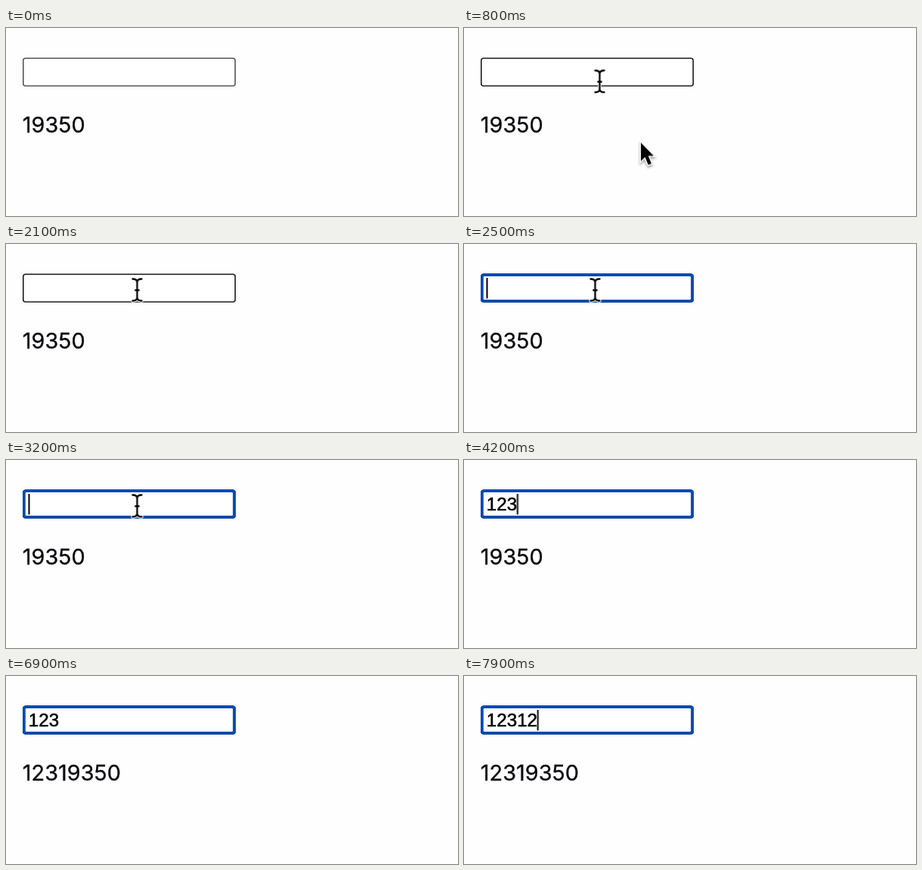
Write an HTML page that moves like this. It is 598 px wide and 250 px high and loops after 8 s.

```html
<!DOCTYPE html>
<html lang="en">
<head>
<meta charset="utf-8">
<title>Text field and label</title>
<style>
  html, body { margin: 0; width: 100%; height: 100%; overflow: hidden; background: #fefefe; }
  svg { display: block; width: 598px; height: 250px; }

  .label { font: 28.9px Inter, sans-serif; fill: #07070d; stroke: #07070d; stroke-width: .3; }
  .typed { font: 24.2px "Liberation Sans", Arial, sans-serif; fill: #000; stroke: #000; stroke-width: .5; }
  .caret { fill: #000; }
  .border { fill: #fff; stroke: #565656; stroke-width: 1.6; }
  .ring { fill: none; stroke: #0d4aad; stroke-width: 3.8; }
  .halo { fill: none; stroke: #fff; stroke-width: 4.5; stroke-linecap: round; }
  .beam { fill: none; stroke: #000; stroke-width: 2.3; stroke-linecap: round; }
  .pointer { fill: #000; stroke: #fff; stroke-width: 3; paint-order: stroke; filter: drop-shadow(0 2px 1.5px #0006); }

  /* Every change is a hard cut; 1% is 80 ms. */
  .anim { animation: 8s step-end infinite; }
  .border { animation-name: border; }
  .ring { animation-name: ring; }
  .pointer { animation-name: pointer; }
  .ibeam { animation-name: ibeam; }
  .mask { animation-name: type; }
  .caret { animation-name: blink, advance; }
  .before { animation-name: before; }
  .after { animation-name: after; }

  @keyframes border { 0% { stroke: #565656 } 7.5%, 100% { stroke: #1c1c1c } }
  @keyframes ring { 0% { visibility: hidden } 30%, 100% { visibility: visible } }
  @keyframes before { 0% { visibility: visible } 71.25%, 100% { visibility: hidden } }
  @keyframes after { 0% { visibility: hidden } 71.25%, 100% { visibility: visible } }

  @keyframes pointer {
    0% { visibility: hidden; transform: translate(240px, 175px) }
    7.5% { visibility: visible; transform: translate(240px, 175px) }
    8.75% { visibility: visible; transform: translate(234px, 152.5px) }
    11.25%, 100% { visibility: hidden; transform: translate(234px, 152.5px) }
  }
  @keyframes ibeam {
    0% { visibility: hidden; transform: translate(179.5px, 71px) }
    10% { visibility: visible; transform: translate(179.5px, 71px) }
    11.25% { visibility: visible; transform: translate(178px, 65px) }
    12.5% { visibility: visible; transform: translate(177.3px, 62.5px) }
    13.75% { visibility: visible; transform: translate(176.7px, 61.7px) }
    16.25% { visibility: visible; transform: translate(175.5px, 61px) }
    26.25% { visibility: visible; transform: translate(173.5px, 61px) }
    48.75%, 100% { visibility: hidden; transform: translate(173.5px, 61px) }
  }

  /* One digit is 13.45px wide. */
  @keyframes type {
    0% { width: 0 }
    48.75% { width: 13.45px }
    51.25% { width: 26.9px }
    52.5% { width: 40.35px }
    90% { width: 53.8px }
    96.25%, 100% { width: 67.25px }
  }
  @keyframes advance {
    0% { transform: none }
    48.75% { transform: translateX(13.45px) }
    51.25% { transform: translateX(26.9px) }
    52.5% { transform: translateX(40.35px) }
    90% { transform: translateX(53.8px) }
    96.25%, 100% { transform: translateX(67.25px) }
  }
  @keyframes blink {
    0%, 37.5%, 55%, 71.25% { visibility: hidden }
    30%, 40%, 62.5%, 90%, 100% { visibility: visible }
  }
</style>
</head>
<body>
<svg viewBox="0 0 598 250">
  <defs>
    <clipPath id="entry"><rect class="mask anim" x="30" y="42" width="0" height="33"/></clipPath>
    <path id="beam" d="M-6 -14.5C-3 -14.5 0 -13.5 0 -10C0 -13.5 3 -14.5 6 -14.5M0 -10V10M-6 14.5C-3 14.5 0 13.5 0 10C0 13.5 3 14.5 6 14.5M-2.2 0.5H2.2"/>
  </defs>

  <rect class="border anim" x="22.8" y="40.2" width="280.4" height="36.8" rx="3"/>
  <rect class="ring anim" x="23.9" y="41" width="278.1" height="35" rx="3"/>

  <text class="typed" x="29.8" y="67" clip-path="url(#entry)">12312</text>
  <rect class="caret anim" x="29.5" y="45" width="2" height="27.5"/>

  <text class="label before anim" x="21.8" y="139">19350</text>
  <text class="label after anim" x="21.8" y="139">12319350</text>

  <path class="pointer anim" d="M0 0V24.5L5.5 19.3L9.8 29.5L14 27.7L9.7 17.4H17Z"/>
  <g class="ibeam anim">
    <use href="#beam" class="halo"/>
    <use href="#beam" class="beam"/>
  </g>
</svg>
</body>
</html>
```
